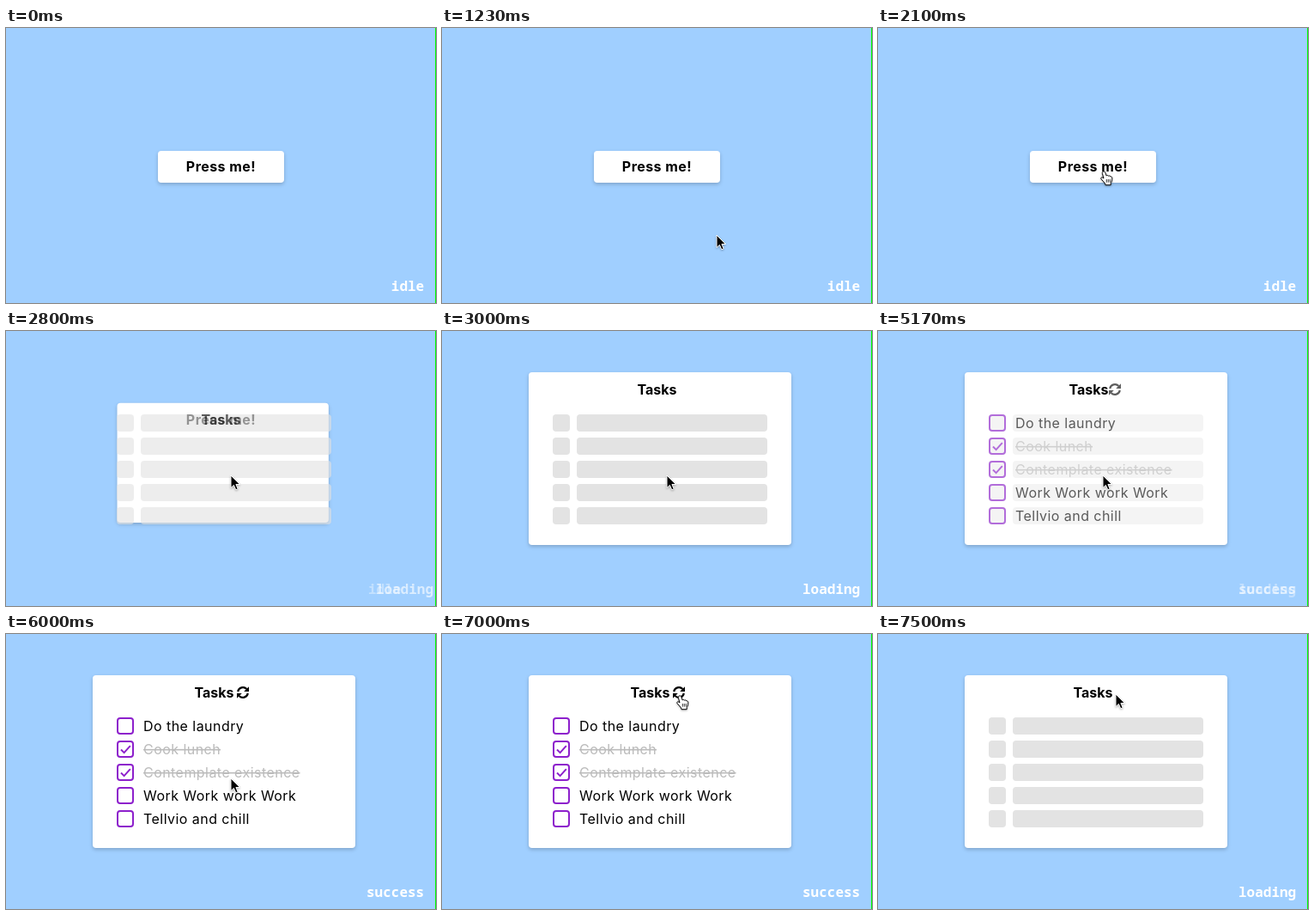
Animation, 501 px wide and 320 px high, one loop 8 s. Source, as an HTML page:

```html
<!DOCTYPE html>
<html lang="en">
<head>
<meta charset="utf-8">
<title>Task card</title>
<style>
  html, body { margin: 0; width: 100%; height: 100%; overflow: hidden; background: #a0cfff; }
  svg { display: block; }
  text { font: 16px Inter, "Open Sans", sans-serif; letter-spacing: .45px; white-space: pre; }
  .title { font-weight: 700; text-anchor: middle; }
  .state { font: 600 16px "Noto Sans Mono", "DejaVu Sans Mono", monospace; letter-spacing: 0; fill: #fff; }
  .done { fill: #bbb; text-decoration: line-through; }
  .box { fill: none; stroke: #8d20cc; stroke-width: 2; }
  #card { fill: #fff; filter: drop-shadow(0 2px 2px rgba(0, 0, 0, .2)); }
  #cursor { filter: drop-shadow(0 1px 1px rgba(0, 0, 0, .3)); }
</style>
</head>
<body>
<svg width="501" height="320" viewBox="0 0 501 320">
  <rect x="500" width="1" height="320" fill="#0f0"/>
  <rect id="card" rx="4"/>
  <g id="bones" fill="#e3e3e3"></g>
  <g id="tasks"></g>
  <text id="press" class="title">Press me!</text>
  <text id="title" class="title" style="letter-spacing:0">Tasks</text>
  <g id="icon">
    <g id="half">
      <path d="M-5.8-1A5.9 5.9 0 0 1 4.4-3.9" fill="none" stroke="#000" stroke-width="2.2"/>
      <path d="M7-6.8V-1H1.2z"/>
    </g>
    <use href="#half" transform="rotate(180)"/>
  </g>
  <text id="idle" class="state" y="306">idle</text>
  <text id="loading" class="state" y="306">loading</text>
  <text id="success" class="state" x="420" y="306">success</text>
  <g id="cursor">
    <path id="arrow" d="M0 0V14.5L3.4 11.4 5.8 16.8 8.2 15.7 5.9 10.5H10.5z" stroke="#fff"/>
    <g id="hand" transform="translate(-4 0)" stroke="#000" stroke-linejoin="round">
      <path fill="#fff" d="M3.2 1.2C4.4.4 5.4 1 5.8 2.2L7.2 6C8 5 9.3 5.3 9.6 6.3 10.5 5.5 11.6 6 11.8 7 12.8 6.6 13.8 7.3 13.8 8.5 13.8 11 13.2 13 12.2 14.5V16.7H6L5.6 15C4 12.8 2.4 11.4 1 9.7.2 8.6 1.3 7.4 2.6 8L4 9 2.4 3.4C2.1 2.4 2.4 1.6 3.2 1.2z"/>
      <path d="M7.3 10v3.6M9.3 10v3.6M11.3 10v3.6" stroke-width=".8"/>
    </g>
  </g>
</svg>
<script>
const LOOP = 8000;
const $ = id => document.getElementById(id);
const set = (id, attrs) => {
  for (const k in attrs) $(id).setAttribute(k, attrs[k]);
};
const mix = (a, b, k) => a + (b - a) * k;
const ease = (t, from, to) => {
  const k = Math.min(1, Math.max(0, (t - from) / (to - from)));
  return (1 - Math.cos(Math.PI * k)) / 2;
};

const items = [
  ["Do the laundry"],
  ["Cook lunch", true],
  ["Contemplate existence", true],
  ["Work Work work Work"],
  ["Tellvio and chill"]
];
items.forEach(([label, done], i) => {
  const y = 97 + 27 * i;
  $("bones").innerHTML +=
    `<rect x="129" y="${y}" width="20" height="20" rx="4"/>
     <rect x="157" y="${y}" width="222" height="20" rx="4"/>`;
  $("tasks").innerHTML +=
    `<rect class="box" x="130" y="${y + 1}" width="18" height="18" rx="3"/>
     ${done ? `<path class="box" d="M134 ${y + 10.5}l3.6 3.6 7.2-8"/>` : ""}
     <text class="${done ? "done" : ""}" x="160" y="${y + 16}">${label}</text>`;
});

// Pointer path: time, x, y
const path = [
  [1090, 293, 316], [1160, 305, 270], [1200, 316, 237], [1230, 320, 241],
  [1420, 320, 241], [1520, 333, 239], [1640, 325, 227], [1780, 300, 205],
  [1900, 273, 186], [1990, 258, 174], [2060, 261, 167], [2100, 263, 166],
  [2230, 262, 168], [6300, 262, 168], [6400, 264, 153], [6500, 271, 100],
  [6560, 276, 77], [6600, 277, 71], [7470, 277, 71], [7500, 277, 70], [LOOP, 277, 70]
];

function pointer(t) {
  const i = Math.max(1, path.findIndex(p => p[0] > t));
  const [a, b] = [path[i - 1], path[i]];
  const k = Math.max(0, (t - a[0]) / (b[0] - a[0]));
  return [mix(a[1], b[1], k), mix(a[2], b[2], k)];
}

function draw(t) {
  const open = ease(t, 2530, 2997);
  const leaving = t > 6000;
  const ready = leaving ? 1 - ease(t, 6990, 7490) : ease(t, 4990, 5300);

  set("card", {
    x: mix(177, 101, open), y: mix(143, 48, open),
    width: mix(147, 306, open), height: mix(37, 201, open)
  });
  const titleY = mix(167, 74, open);
  set("press", { x: 250.5, y: titleY, opacity: 1 - open });
  set("title", { x: 250.5 - 8 * ready, y: titleY, opacity: open });
  set("bones", { opacity: open * (1 - ready) });
  set("tasks", { opacity: ready });
  const rise = leaving ? 22 * (1 - ready) : 0;
  set("icon", { transform: `translate(276 ${68 - rise})`, opacity: ready });

  set("idle", { x: 448.8 - 43 * open, opacity: 1 - open });
  set("loading", { x: mix(448.8, 420, open), opacity: open * (1 - ready) });
  set("success", { opacity: ready });

  const [x, y] = pointer(t);
  const hand = t < 2560 ? y < 180 : y < 76 && t < 7470;
  set("cursor", { transform: `translate(${x} ${y})`, visibility: t < 1090 ? "hidden" : "visible" });
  set("arrow", { display: hand ? "none" : "inline" });
  set("hand", { display: hand ? "inline" : "none" });
}

const start = performance.now();
function frame() {
  draw((performance.now() - start) % LOOP);
  requestAnimationFrame(frame);
}
frame();
</script>
</body>
</html>
```
